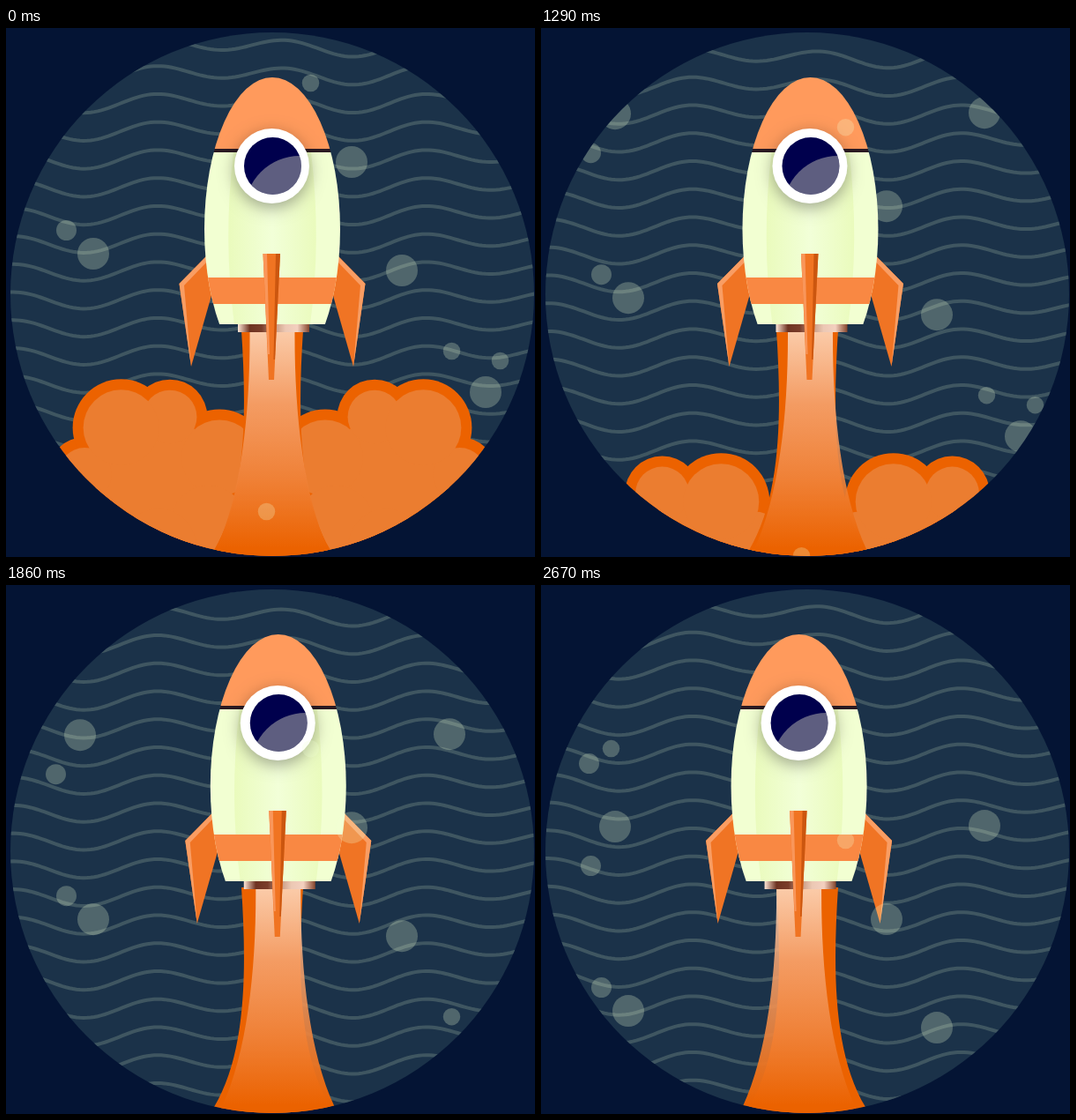
An HTML page with a canvas that plays this animation: 600 px wide and 600 px high, repeating every 2700 ms.

```html
<!DOCTYPE html>
<html lang="en">
<head>
<meta charset="utf-8">
<title>Rocket launch</title>
<style>
  html, body { margin: 0; width: 100%; height: 100%; overflow: hidden; background: #041434; }
  canvas { display: block; }
</style>
</head>
<body>
<canvas id="stage" width="600" height="600"></canvas>
<script>
const ctx = document.getElementById('stage').getContext('2d');
const TAU = 2 * Math.PI;
const LOOP = 2700, LIFTOFF = 900;
const CENTER = 302, WAVE_GAP = 31.75;

function group(draw) {
  ctx.save();
  draw();
  ctx.restore();
}

function mirrored(draw) {
  draw();
  group(() => {
    ctx.translate(2 * CENTER, 0);
    ctx.scale(-1, 1);
    draw();
  });
}

function circle(x, y, r, color) {
  ctx.fillStyle = color;
  ctx.beginPath();
  ctx.arc(x, y, r, 0, TAU);
  ctx.fill();
}

function rect(x, y, w, h, color) {
  ctx.fillStyle = color;
  ctx.fillRect(x, y, w, h);
}

function shape(d, color) {
  ctx.fillStyle = color;
  ctx.fill(new Path2D(d));
}

function clipEllipse(x, y, rx, ry) {
  ctx.beginPath();
  ctx.ellipse(x, y, rx, ry, 0, 0, TAU);
  ctx.clip();
}

// Evenly spaced colour stops
function gradient(x0, y0, x1, y1, ...colors) {
  const g = ctx.createLinearGradient(x0, y0, x1, y1);
  colors.forEach((color, i) => g.addColorStop(i / (colors.length - 1), color));
  return g;
}

const flameFill = gradient(0, 345, 0, 590,
  'rgba(253,218,193,.87)', 'rgba(245,164,113,.87)', 'rgba(240,133,62,.9)', '#eb6200');
const panelFill = gradient(253, 0, 351, 0, '#eafbbd', '#f2ffd8', '#eafbbd');
const nozzleFill = gradient(263, 0, 344, 0,
  '#ffe6d6', '#6e3322', '#7a3d2a', '#c4957d', '#ecc8b4', '#f3d0bf', '#85452c');

function drawWaves(scroll) {
  ctx.strokeStyle = '#3f5661';
  ctx.lineWidth = 4;
  ctx.beginPath();
  for (let top = scroll % WAVE_GAP - 52; top < 600; top += WAVE_GAP) {
    for (let x = 0; x <= 600; x += 4) {
      const a = (x - 172) / 305 * TAU;
      const y = top + 9.3 - 8 * Math.cos(2 * a + .23) - 4 * Math.cos(a - 1.15);
      x ? ctx.lineTo(x, y) : ctx.moveTo(x, y);
    }
  }
  ctx.stroke();
}

// Round puffs sit on a rim around the cloud's hub; the rim widens on the outer side
function drawCloud(turn, drop) {
  const hubX = 173, hubY = 514 + drop;
  const puffs = (angles, r, color) => angles.forEach(angle => {
    const dist = 74 + Math.max(0, -35 - angle) * .2;
    const a = (angle + turn) * TAU / 360;
    circle(hubX + dist * Math.sin(a), hubY - dist * Math.cos(a), r, color);
  });
  const layer = (inset, color) => {
    circle(hubX, hubY, 72, color);
    puffs([-130, -85, 10], 42.5 - inset, color);
    puffs([-35, 69, 130, 180], 55 - inset, color);
  };
  layer(0, '#ec6200');
  layer(12, '#eb7d30');
}

// Half of a flame as wide curve, closed with its mirror image
function drawFlame(topX, curve1, curve2, bottomX, color) {
  const m = x => 2 * CENTER - x;
  shape(`M${topX} 343C${curve1} 435 ${curve2} 530 ${bottomX} 592L${bottomX - 5} 604
    H${m(bottomX - 5)}L${m(bottomX)} 592C${m(curve2)} 530 ${m(curve1)} 435 ${m(topX)} 343Z`, color);
}

function drawHull() {
  group(() => {
    clipEllipse(CENTER, 228, 77, 172);
    rect(220, 50, 164, 87, '#ff9a5c');
    rect(220, 137, 164, 4, '#2b1a22');
    rect(220, 141, 164, 195, '#f2ffd2');
    shape('M258 141Q246 240 259 336H345Q358 240 346 141Z', panelFill);
    rect(220, 283, 164, 30, '#f98843');
  });
}

function drawWindow() {
  group(() => {
    ctx.shadowColor = 'rgba(0,0,0,.35)';
    ctx.shadowBlur = 18;
    ctx.shadowOffsetY = 5;
    circle(301.5, 156.5, 42.5, '#fff');
  });
  group(() => {
    clipEllipse(302.5, 156.5, 32.5, 32.5);
    rect(260, 120, 90, 80, '#00004d');
    circle(333, 207, 62, 'rgba(255,255,214,.37)');
  });
}

function drawRocket() {
  mirrored(() => {
    shape('M229 257L196.5 290L210 384L234 300Z', '#f07424');
    shape('M229 257L196.5 290L210 384L202 292L229 264Z', '#f99d63');
  });
  rect(263, 336, 81, 9, nozzleFill);
  drawHull();
  drawWindow();
  shape('M291.5 256H311L304 399H298Z', '#f07422');
  shape('M291.5 256H296L299 370H297Z', '#f9965a');
  shape('M306 256H311L305 376H303.5Z', '#cb560f');
}

function drawBubbles(drop) {
  const bubbles = (r, ...centers) => centers.forEach(([x, y]) =>
    circle(x, y + drop, r, 'rgba(238,255,210,.25)'));
  bubbles(18, [392, 152], [99, 256], [449, 275], [544, 413], [84, 47], [503, 46]);
  bubbles(11.5, [68.5, 229.5], [56.5, 91.5], [54.5, -24.5]);
  bubbles(9.75, [345.5, 62.5], [505.5, 366.5], [560.5, 377.5], [295.5, 548.5], [79.5, -41.5]);
}

function draw(time) {
  const flight = Math.max(0, time - LIFTOFF);
  const turn = Math.min(time, LIFTOFF) / 15;
  const sway = Math.min(flight / 900 * 8, 8 - (flight - 900) / 900 * 18);

  rect(0, 0, 600, 600, '#041434');
  group(() => {
    clipEllipse(CENTER, CENTER, 297, 297);
    rect(0, 0, 600, 600, '#1b3249');
    drawWaves(flight * .1135);
    mirrored(() => drawCloud(turn, flight * .2308));
    drawFlame(267, 273, 273, 236, '#eb6200');
    group(() => {
      ctx.translate(sway, 0);
      drawFlame(276.5, 277, 267, 238, flameFill);
      drawRocket();
    });
    drawBubbles(flight * .1282);
  });
}

function tick() {
  draw(performance.now() % LOOP);
  requestAnimationFrame(tick);
}
tick();
</script>
</body>
</html>
```
